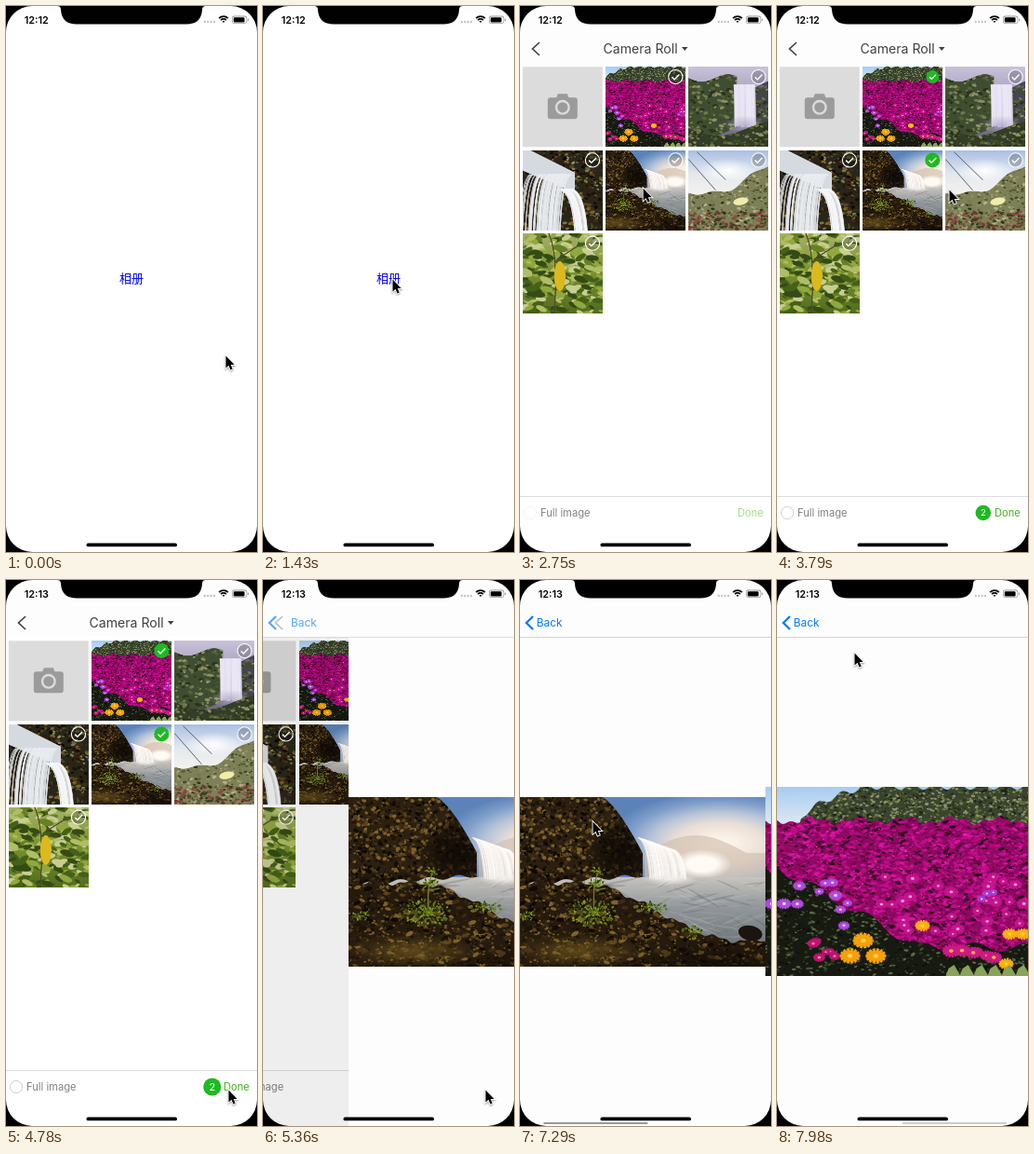
Recreate the animation shown at these times as an HTML page with a canvas. Size 270 by 586 pixels, loop 8 s.

```html
<!DOCTYPE html>
<html lang="en">
<head>
<meta charset="utf-8">
<title>Photo picker</title>
<style>
html, body { margin: 0; height: 100%; overflow: hidden; background: #fff; }
canvas { display: block; width: 100%; height: 100%; }
</style>
</head>
<body>
<canvas id="stage"></canvas>
<script>
const W = 270, H = 586, LOOP = 8000;
const SANS = 'Inter, "Liberation Sans", sans-serif';
const CJK = '"Noto Sans CJK SC", "Noto Sans CJK JP", sans-serif';
const dpr = window.devicePixelRatio || 1;
const stage = document.getElementById('stage');
stage.width = W * dpr;
stage.height = H * dpr;
const screen2d = stage.getContext('2d');
let g = screen2d, seed = 1;

// ---------- helpers (all paint on g) ----------
const rand = (a = 0, b = 1) => {
  seed = seed * 16807 % 2147483647;
  return a + (b - a) * seed / 2147483647;
};
const pick = list => list[Math.floor(rand(0, list.length))];
const clamp = v => Math.max(0, Math.min(1, v));
const smooth = v => (v = clamp(v), v * v * (3 - 2 * v));

function rect(color, x, y, w, h) {
  g.fillStyle = color;
  g.fillRect(x, y, w, h);
}
function pill(color, x, y, w, h, r) {
  g.fillStyle = color;
  g.beginPath();
  g.roundRect(x, y, w, h, r);
  g.fill();
}
function oval(color, x, y, rx, ry = rx, turn = 0) {
  g.fillStyle = color;
  g.beginPath();
  g.ellipse(x, y, rx, ry, turn, 0, 7);
  g.fill();
}
function ring(color, width, x, y, r, from = 0, to = 7) {
  g.beginPath();
  g.arc(x, y, r, from, to);
  g.strokeStyle = color;
  g.lineWidth = width;
  g.stroke();
}
function line(color, width, d) {
  g.strokeStyle = color;
  g.lineWidth = width;
  g.stroke(new Path2D(d));
}
function shape(color, d) {
  g.fillStyle = color;
  g.fill(new Path2D(d));
}
function text(str, x, y, size, color, align = 'left', weight = 400, family = SANS) {
  g.font = `${weight} ${size}px ${family}`;
  g.textAlign = align;
  g.fillStyle = color;
  g.fillText(str, x, y);
}
function at(x, y, alpha, draw) {
  g.save();
  g.translate(x, y);
  g.globalAlpha *= alpha;
  draw();
  g.restore();
}

// ---------- landscape helpers ----------
function blend(fill, colors) {
  colors.forEach((c, i) => fill.addColorStop(i / (colors.length - 1), c));
  return fill;
}
function sky(y, h, ...colors) {
  rect(blend(g.createLinearGradient(0, y, 0, y + h), colors), 0, y, W, h);
}
function glow(x, y, rx, ry, ...colors) {
  at(x, y, 1, () => {
    g.scale(1, ry / rx);
    rect(blend(g.createRadialGradient(0, 0, 0, 0, 0, rx), colors), -W, -W, 2 * W, 2 * W);
  });
}
// land between two edges, each a number or a function of x; draw() is clipped to it
function land(color, x0, x1, top, bottom, draw = () => {}) {
  const y = (edge, x) => typeof edge === 'number' ? edge : edge(x);
  g.save();
  g.beginPath();
  for (let x = x0; x <= x1; x++) g.lineTo(x, y(top, x));
  for (let x = x1; x >= x0; x--) g.lineTo(x, y(bottom, x));
  g.fillStyle = color;
  g.fill();
  g.clip();
  draw();
  g.restore();
}
function specks(n, x, y, w, h, min, max, colors, flat = .6) {
  for (let i = 0; i < n; i++) {
    const r = rand(min, max);
    oval(pick(colors), x + rand(0, w), y + rand(0, h), r, r * flat, rand(-.6, .6));
  }
}
function bush(x, y, w, h) {
  for (let i = 0; i < w * h * .6; i++) {
    const a = rand(0, 6.3), d = rand();
    oval(pick(['#8c9a2a', '#65801d', '#4d6518', '#2f3a10']),
      x + w * d * Math.cos(a), y + h * d * Math.sin(a), rand(.6, 1.8), rand(.5, 1.2), a);
  }
}
function cascade(n, x, y, w, h, slope, bend, color) {
  for (let i = 0; i < n; i++) {
    const u = rand(), left = x + w * u, top = y + slope * u;
    line(color, rand(.8, 2.4), `M${left} ${top}q${bend * .8} 4 ${bend} ${y + h - top + rand(-2, 2)}`);
  }
}
function bloom(x, y, r, petal, heart) {
  for (let i = 0; i < 14; i++) {
    const a = i * Math.PI / 7;
    line(petal, r * .28, `M${x} ${y}l${r * Math.cos(a)} ${r * .75 * Math.sin(a)}`);
  }
  oval(heart, x, y, r * .25, r * .2);
}
function blooms(n, x, y, w, h, r, petal, heart) {
  for (let i = 0; i < n; i++) bloom(x + rand(0, w), y + rand(0, h), r * rand(.7, 1.1), petal, heart);
}

// ---------- pictures ----------
function photo(w, h, paint) {
  const c = document.createElement('canvas');
  c.width = w * 2;
  c.height = h * 2;
  g = c.getContext('2d');
  g.scale(2, 2);
  seed = 4711;
  paint();
  g = screen2d;
  return c;
}
const EARTH = ['#0f0a06', '#1b130b', '#2c1f10', '#3d2b14', '#5a421c', '#80622a'];
const MOSS = ['#2a3318', '#3f4d26', '#566236', '#727c4c', '#8d9163'];

const waterfall = photo(270, 182, () => {
  glow(222, 50, 125, 56, '#fffaf3', '#f8ede2', '#eadfd6', '#b9c6da', '#809fcb', '#5c83b9');
  land('#d3c1b0aa', 140, 270, x => 60 - 19 * Math.sin((x - 140) / 35) * (x < 250), 90);
  glow(202, 72, 32, 16, '#fffaf4', '#fffaf4', '#fffaf400');
  sky(86, 96, '#c8c4be', '#91979a', '#757c80', '#5c6366');
  specks(160, 70, 90, 200, 60, 6, 20, ['#a9adac44', '#50595d44', '#d4d1cc33'], .06);
  cascade(150, 132, 43, 40, 44, 14, 13, '#fffaf544');
  glow(168, 88, 30, 7, '#f4efeb', '#f4efeb00');
  land('#2c2010', 0, 138, x => 60 * clamp((x - 94) / 44) ** 1.4, x => 94 - x / 14 + 2 * Math.sin(x / 5), () => {
    specks(1500, 0, 0, 140, 96, .5, 2.6, EARTH, .8);
    glow(118, 62, 44, 42, '#0c0805dd', '#0c080599', '#0c080500');
    glow(30, 98, 80, 22, '#0c0805bb', '#0c080500');
  });
  const shore = x => 92 + 62 * smooth((x - 70) / 170) + 2 * Math.sin(x / 6) + Math.sin(x / 2.3);
  land('#251a0d', 0, 270, shore, 182, () => {
    specks(600, 0, 90, 270, 92, 1.5, 5, EARTH, .5);
    specks(1100, 0, 90, 270, 92, .5, 1.8, [...EARTH, '#4b4c18', '#6c5728'], .7);
    glow(70, 165, 75, 18, '#7a5f22aa', '#7a5f2200');
    glow(215, 180, 90, 28, '#0c0805aa', '#0c080500');
  });
  oval('#1b140f', 254, 146, 13, 8, .2);
  line('#76862a', 1.3, 'M90 82Q84 95 86 122M88 92L80 98M87 100L98 98');
  bush(90, 80, 8, 5);
  bush(86, 92, 12, 4);
  bush(84, 124, 25, 15);
  bush(148, 118, 17, 6);
  bush(191, 145, 12, 7);
  bush(8, 128, 15, 5);
});

const meadow = photo(270, 203, () => {
  sky(0, 45, '#a8cdf0', '#e3ecf4');
  const hedge = x => 40 - 40 * Math.sqrt(clamp((x - 24) / 70)) + 3 * Math.sin(x / 4);
  land('#39442f', 24, 270, hedge, 48, () =>
    specks(1500, 20, 0, 250, 48, .6, 2.3, ['#1d2419', ...MOSS, '#8a947c']));
  rect('#171a11', 0, 46, 270, 157);
  specks(1700, 0, 75, 270, 128, .6, 2.6, ['#0e110b', '#1a2113', '#2c381d', '#435035', '#5d6a4a'], .5);
  const field = x => Math.min(172, 86 + x * .56) + 5 * Math.sin(x / 9);
  land('#8d0a62', 0, 270, x => 36 + 3 * Math.sin(x / 8) + 2 * Math.sin(x / 3), field, () => {
    specks(4200, 0, 30, 270, 145, .8, 3.8,
      ['#c20d8c', '#d316a0', '#b00a78', '#c20d8c', '#990a66', '#6b0748', '#2d0a1e'], .45);
    specks(260, 0, 45, 270, 125, .4, .8, ['#ef73c9']);
  });
  blooms(30, 90, 90, 180, 70, 7, '#c5148f', '#efa6cd');
  blooms(10, 0, 95, 80, 55, 7, '#b04be0', '#f0dcf2');
  blooms(3, 205, 108, 40, 25, 6, '#a83fd0', '#f0dcf2');
  blooms(6, 38, 165, 30, 20, 6, '#c21375', '#e591b5');
  blooms(6, 180, 174, 90, 10, 9, '#cd1a83', '#f5b04e');
  for (let i = 0; i < 4; i++)
    bloom(92 + 16 * Math.sin(i * 2.1), 176 - 11 * Math.cos(i * 2.1), 11, '#f4a20b', '#ffd04a');
  for (const [x, y] of [[156, 149], [250, 158], [264, 158], [246, 190]])
    bloom(x, y, 8, '#f8b010', '#ffcf49');
  for (let x = 181; x < 270; x += 15)
    shape('#8aa25a', `M${x} 203l3 -8l6 -4l7 12z`);
});

const gorge = photo(86, 86, () => {
  sky(0, 86, '#c9c2da', '#9a91b2', '#5d5870');
  land('#3f4d33', 0, 52, x => 12 + 4 * Math.sin(x / 9), x => 86 - x * .4, () =>
    specks(260, 0, 8, 56, 80, .8, 3, MOSS));
  land('#454450', 68, 86, x => 24 - (x - 68) / 2, 86, () =>
    specks(90, 66, 14, 22, 72, 1, 3, ['#635c6d', ...MOSS]));
  cascade(60, 49, 19, 22, 44, 0, 1, '#ece8f799');
  glow(60, 62, 22, 10, '#b5accbcc', '#b5accb00');
  land('#333d28', 0, 86, x => 66 + 8 * Math.sin(x / 20), 86, () =>
    specks(160, 0, 60, 86, 26, .8, 3, MOSS));
});

const rapids = photo(86, 86, () => {
  rect('#29251a', 0, 0, 86, 86);
  specks(450, 0, 0, 86, 86, .7, 3.3, EARTH);
  specks(80, 45, 0, 41, 86, .7, 2.5, MOSS);
  land('#d5dae0', 0, 56, x => x * .5 - 4, x => 22 + x * .42);
  cascade(55, 8, 26, 44, 62, 0, -12, '#e9edf0cc');
  cascade(30, 38, 42, 16, 46, 0, 16, '#f6f7f8cc');
});

const dune = photo(86, 86, () => {
  sky(0, 50, '#a9bfe2', '#e2e8ef', '#f7f3ee');
  glow(42, 22, 30, 13, '#ffffff', '#ffffff00');
  land('#7e8057', 0, 86, x => 46 - 34 * smooth((x - 30) / 70) + 2 * Math.sin(x / 6), 86, () => {
    specks(420, 0, 10, 86, 76, .6, 2.4, [...MOSS, '#a8a27c', '#b9b08c']);
    specks(160, 0, 66, 86, 20, .7, 2.5, ['#713a35', '#37401f', '#8b4a40']);
  });
  line('#5a5b60', .7, 'M0 10L29 43M9 2L40 32');
  oval('#f0edab', 56, 55, 8, 4, -.2);
});

const leaves = photo(86, 86, () => {
  sky(0, 86, '#a5b269', '#78902f', '#526c20');
  specks(260, 0, 0, 86, 86, 2, 8,
    ['#91a83e', '#456019', '#b0bd66', '#658025', '#354b16', '#c7ce91'], .45);
  line('#53452a', 1.2, 'M28 0Q39 24 34 86M37 28L62 12');
  oval('#dcb91d', 40, 46, 6, 16);
});

// ---------- interface ----------
const TAP1 = 2920, TAP2 = 3620;
const pulse = s => s < 0 || s > 250 ? 1 : 1 + .15 * Math.sin(s / 250 * 2 * Math.PI);

function tick(x, y, on, size) {
  at(x, y, 1, () => {
    g.scale(size, size);
    oval(on ? '#1fb922' : '#00000033', 0, 0, 8);
    if (!on) ring('#fff', 1.1, 0, 0, 7.6);
    line('#fff', 1.4, 'M-3.8 .2L-1.2 2.8L4 -2.5');
  });
}
function cameraTile(x, y) {
  at(x, y, 1, () => {
    rect('#dcdcdc', 0, 0, 86, 86);
    pill('#9b9b9b', 27, 33, 32, 23, 3);
    shape('#9b9b9b', 'M36 34L38 29H48L50 34Z');
    oval('#dcdcdc', 43, 43.5, 8);
    oval('#9b9b9b', 43, 43.5, 5.6);
  });
}

function picker(t) {
  rect('#fff', 0, 0, W, H);
  [null, meadow, gorge, rapids, waterfall, dune, leaves].forEach((pic, i) => {
    const x = 2.8 + i % 3 * 89.3, y = 65.3 + Math.floor(i / 3) * 89.3;
    if (!pic) return cameraTile(x, y);
    const side = pic.height;
    g.drawImage(pic, (pic.width - side) / 2, 0, side, side, x, y, 86, 86);
    const tap = pic === waterfall ? TAP1 : pic === meadow ? TAP2 : Infinity;
    tick(x + 75.2, y + 10.8, t >= tap, pulse(t - tap));
  });
  const count = (t >= TAP1) + (t >= TAP2);
  rect('#dedede', 0, 526, W, 1);
  ring(count ? '#d0d0d0' : '#f4f4f4', 1, 11, 544, 6.6);
  text('Full image', 22, 548, 11.2, '#828282');
  if (count) at(221.8, 544, 1, () => {
    const size = pulse(t - (count > 1 ? TAP2 : TAP1));
    g.scale(size, size);
    oval('#1fb922', 0, 0, 9.6);
    text(count, 0, 4, 11, '#fff', 'center');
  });
  const faded = !count || t > 5080 && t < 5220;
  text('Done', 234, 548, 11.1, faded ? '#a9d988' : '#45b31b');
}

function viewer(t, scroll) {
  rect('#fdfdfd', 0, 0, W, H);
  g.drawImage(waterfall, -scroll, 233, 270, 182);
  g.drawImage(meadow, W - scroll, 222, 270, 203);
  if (t > 7235) at(0, 0, clamp((8080 - t) / 200), () =>
    pill('#00000066', 22.5 + scroll * 112.5 / W, 582, 112.5, 2, 1));
}

function navBar(b) {
  rect('#fdfdfd', 0, 0, W, 61);
  at(-60 * b, 0, clamp(1 - 2 * b), () => {
    text('Camera Roll', 89.5, 51, 14.1, '#404040');
    shape('#404040', 'M174 44H180.5L177.2 48Z');
  });
  at(0, 0, 1 - b, () => line('#444', 1.7, 'M21 39L13.5 46L21 53'));
  at(0, 0, b, () => {
    line('#007aff', 2.2, 'M14 39L6.8 46L14 53');
    text('Back', 17.8 + 36 * (1 - b), 50.3, 11.9, '#007aff');
    rect('#d2d2d2', 0, 61, W, 1);
  });
}

const BEZEL = new Path2D('M0 0H270V586H0Z');
BEZEL.roundRect(0, 0, W, H, 28);

function phone(t) {
  text(t < 4200 ? '12:12' : '12:13', 32.8, 18.6, 10.8, '#000', 'center', 600);
  for (let i = 0; i < 4; i++) oval('#c4c4c4', 213.8 + i * 3.4, 17, 1.2);
  for (const r of [6.8, 4.1, 1.2]) ring('#000', 1.8, 234, 18, r, -2.36, -.78);
  pill('#999', 243, 10.6, 16.3, 8.4, 2.4);
  pill('#fff', 243.8, 11.4, 14.7, 6.8, 1.8);
  pill('#000', 244.8, 12.2, 11.8, 5.2, 1.2);
  pill('#999', 260, 13.5, 1, 2.6, .5);
  shape('#000', 'M55 0Q59 0 59 4Q60 19.6 76 19.6H194Q210 19.6 211 4Q211 0 215 0Z');
  g.fillStyle = '#000';
  g.fill(BEZEL, 'evenodd');
  pill('#000', 86.5, 576.6, 97.5, 3.7, 1.85);
}

const ARROW = new Path2D('M0 0V13L3 10.3L5 15L7.2 14L5.2 9.5H9.2Z');
function pointer(x, y) {
  at(x + .5, y + .5, 1, () => {
    g.shadowColor = '#0006';
    g.shadowBlur = 2 * dpr;
    g.shadowOffsetY = dpr;
    g.strokeStyle = '#fff';
    g.lineWidth = 1.8;
    g.stroke(ARROW);
    g.shadowColor = 'transparent';
    g.fillStyle = '#000';
    g.fill(ARROW);
  });
}

// ---------- motion ----------
// pointer moves: start, end, x, y; it rests in between
const MOVES = [
  [60, 230, 190, 329], [410, 870, 139, 293], [1850, 2040, 140, 226], [2220, 2460, 131, 198],
  [2690, 3270, 167, 112], [3510, 3620, 167, 75], [3620, 3790, 185, 197], [3840, 4310, 252, 490],
  [4370, 4780, 239, 547], [5400, 5889, 52, 142], [6130, 6330, 24, 50], [6330, 6690, 134, 205],
  [6870, 7050, 143, 274], [7230, 7290, 78, 259], [7520, 7960, 83, 78]
];
function pointerAt(t) {
  let x = 236, y = 375;
  for (const [from, to, nx, ny] of MOVES) {
    const u = smooth((t - from) / (to - from));
    x += (nx - x) * u;
    y += (ny - y) * u;
  }
  return [x, y];
}
const spring = (t, start, speed) => {
  const s = Math.max(0, t - start) / 1000 * speed;
  return 1 - (1 + s) * Math.exp(-s);
};

function render() {
  const t = performance.now() % LOOP;
  const a = spring(t, 1430, 20), b = spring(t, 5220, 16);
  const drag = 66 * clamp((t - 7230) / 110) ** 4;
  const scroll = drag + (W - drag) * spring(t, 7520, 18);
  const shade = k => rect(`rgba(0,0,0,${k * .1})`, 0, 0, W, H);

  g.setTransform(stage.width / W, 0, 0, stage.height / H, 0, 0);
  rect('#fff', 0, 0, W, H);
  if (t < 2100) {
    text('相册', 135 - 81 * a, 296.7, 13, '#00f', 'center', 400, CJK);
    shade(a);
  }
  if (t > 1430) {
    if (b < .999) at(W * (1 - a) - 81 * b, 0, 1, () => picker(t));
    if (b > 0) {
      shade(b);
      at(W * (1 - b), 0, 1, () => viewer(t, scroll));
    }
    at(W * (1 - a), 0, 1, () => navBar(b));
  }
  phone(t);
  pointer(...pointerAt(t));
  requestAnimationFrame(render);
}
render();
</script>
</body>
</html>
```
